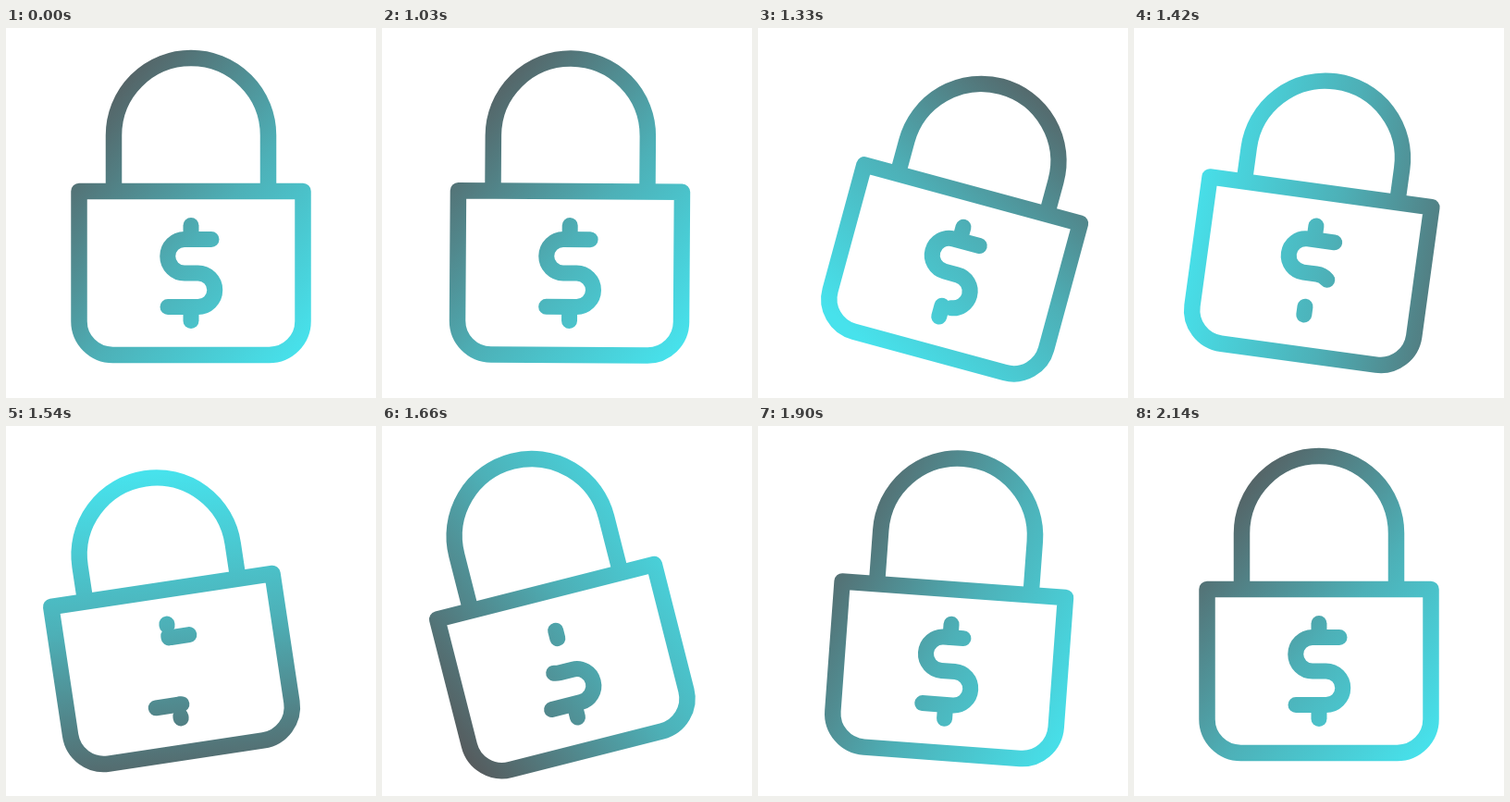
Recreate the animation shown at these times as an HTML page. Size 400 px wide and 400 px high, loop 2170 ms.

```html
<!DOCTYPE html>
<html lang="en">
<head>
<meta charset="utf-8">
<title>Lock</title>
<style>
  html, body { margin: 0; width: 100%; height: 100%; overflow: hidden; background: #fff; }
  svg { display: block; width: 100vw; height: 100vh; }
  path { fill: none; stroke: url(#tint); stroke-width: 17.5; stroke-linecap: round; stroke-linejoin: round; }
  #shackle { stroke-linecap: butt; }
  .trim { stroke-width: 17; }
</style>
</head>
<body>
<svg viewBox="0 0 400 400">
  <defs>
    <linearGradient id="tint" gradientUnits="userSpaceOnUse" x1="-200" y1="0" x2="165" y2="0">
      <stop offset="0" stop-color="#565759"/>
      <stop offset=".548" stop-color="#4db0b7"/>
      <stop offset="1" stop-color="#47e2ec"/>
    </linearGradient>
  </defs>
  <g id="lock">
    <path id="shackle"/>
    <path d="M79 176.5H321V317a36.5 36.5 0 0 1-36.5 36.5H115.500A36.500 36.500 0 0 1 79 317Z"/>
    <path class="trim" pathLength="1" d="M222 228.500H193a18.250 18.250 0 0 0 0 36.500H207.500a18.250 18.250 0 0 1 0 36.500H175"/>
    <path class="trim" pathLength="1" d="M200 213.500V228.500"/>
    <path class="trim" pathLength="1" d="M200 301.500V316.500"/>
  </g>
</svg>
<script>
const LOOP = 2170;
const $ = id => document.getElementById(id);
const lock = $('lock'), shackle = $('shackle'), tint = $('tint');
const trims = document.querySelectorAll('.trim');

// [time, value] keys, eased in and out of every key
const shift = [[1000, 0], [1160, 32], [1520, -19], [1760, 9], [2080, 0]];
const tilt = [[1000, 0], [1310, 15.5], [1640, -14.8], [1840, 5], [2070, 0]];
const drop = [[1000, 0], [1300, 23.5], [1510, 23.5], [1745, -11.5], [1910, 2.2], [2080, 0]];

const span = (t, from, to) => Math.min(1, Math.max(0, (t - from) / (to - from)));

function track(keys, t) {
  let value = keys[0][1];
  for (let i = 1; i < keys.length; i++) {
    const [t0, v0] = keys[i - 1], [t1, v1] = keys[i];
    if (t >= t0) value = v0 + (v1 - v0) * (1 - Math.cos(Math.PI * span(t, t0, t1))) / 2;
  }
  return value;
}

// cubic-bezier(.4, 0, .4, 1)
function ease(p) {
  let lo = 0, hi = 1;
  for (let i = 0; i < 24; i++) {
    const s = (lo + hi) / 2;
    if (1.2 * s * (1 - s) + s ** 3 < p) lo = s; else hi = s;
  }
  return p >= 1 ? 1 : lo * lo * (3 - 2 * lo);
}

// Keeps the stretches 0..head and tail..1 of each stroke
function trim(head, tail) {
  const dash = head > 0 ? `${head} ${tail < 1 ? tail - head : 2} 2` : '2 2';
  for (const el of trims) {
    el.setAttribute('stroke-dasharray', dash);
    el.setAttribute('stroke-dashoffset', head > 0 ? 0 : 4 - tail);
  }
}

function draw(t) {
  const x = track(shift, t), angle = track(tilt, t), y = 116 + track(drop, t);
  const turn = 40 + 360 * ease(span(t, 1000, 2100));
  lock.setAttribute('transform', `translate(${x} 0) rotate(${angle} 200 265)`);
  // Undo the lock's own motion so the gradient turns on the stage
  tint.setAttribute('gradientTransform',
    `rotate(${-angle} 200 265) translate(${220 - x} 212) rotate(${turn})`);
  shackle.setAttribute('d', `M116.5 176.5V${y}a83.5 83.5 0 0 1 167 0V176.5`);
  trim(1 - span(t, 1030, 1560) ** 3, (1 - span(t, 1510, 2110)) ** 3);
}

const start = performance.now();
function tick() {
  draw((performance.now() - start) % LOOP);
  requestAnimationFrame(tick);
}
draw(0);
requestAnimationFrame(tick);
</script>
</body>
</html>
```
